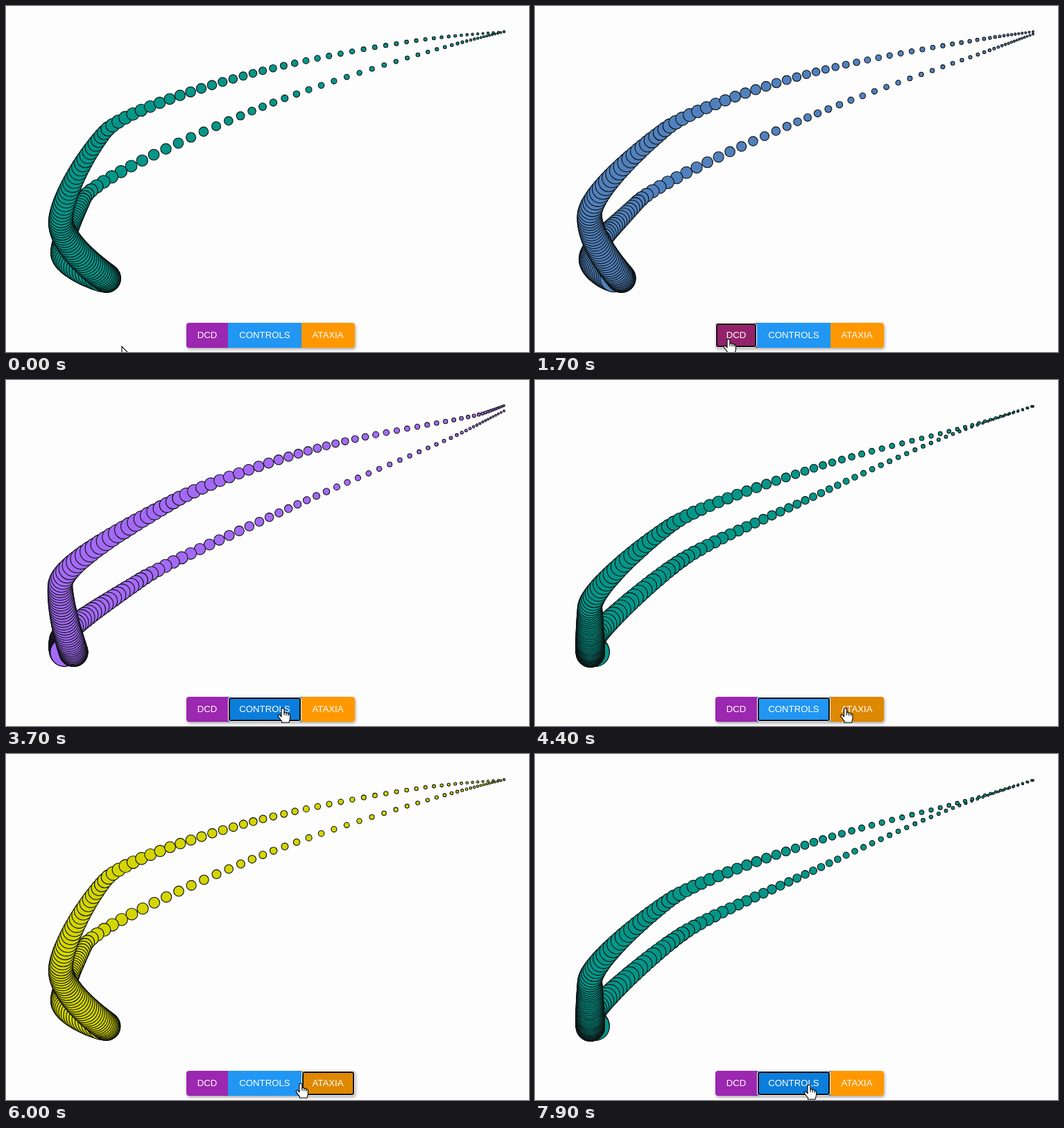
An HTML page with a canvas for the animation above (8000 ms loop, 754 by 498 pixels).

```html
<!DOCTYPE html>
<html lang="en">
<head>
<meta charset="utf-8">
<title>Gait cycle comparison</title>
<style>
  html, body { margin: 0; width: 754px; height: 498px; overflow: hidden; background: #fdfdfd; }
  canvas { position: absolute; left: 0; top: 0; }
  #pointer { z-index: 2; pointer-events: none; }
  .group {
    position: absolute; left: 259.7px; top: 456px; z-index: 1; display: flex;
    border-radius: 4px; box-shadow: 1px 2px 4px rgba(0, 0, 0, .35);
  }
  .group div {
    position: relative; height: 36px; padding: 0 16px; color: #fff; background: var(--base);
    font: 13.2px/36px "Liberation Sans", Arial, sans-serif;
  }
  .group div:first-child { border-radius: 4px 0 0 4px; }
  .group div:last-child { border-radius: 0 4px 4px 0; }
  .group .hover { background: var(--dark); }
  .group .focus::after {
    content: ""; position: absolute; inset: 0; border: 1px solid #fff;
    border-radius: 4px; box-shadow: inset 0 0 0 2px #101010;
  }
</style>
</head>
<body>
<canvas id="trail" width="754" height="498"></canvas>
<div class="group">
  <div style="--base:#9c27b0;--dark:#93226a">DCD</div>
  <div style="--base:#2196f3;--dark:#0b7dda">CONTROLS</div>
  <div style="--base:#ff9800;--dark:#dd8800">ATAXIA</div>
</div>
<canvas id="pointer" width="754" height="498"></canvas>
<script>
const LOOP = 8000, STEP = 100, MORPH = 1000, DOTS = 200;
const LEAD = 1190, TRAVEL = 550; // the pointer sets off this long before a click
const trail = document.getElementById('trail').getContext('2d');
const pointer = document.getElementById('pointer').getContext('2d');
const buttons = [...document.querySelectorAll('.group div')];

// Each shape runs from the tip along the lower strand, round the heel and back along the upper one.
const knots = [0, 14, 32, 50, 75, 92, 93, 128, 153, 170, 188, 199];
const ataxia = curve([
  [718, 37], [651, 54], [370, 145], [113, 276], [82, 354], [138, 391],
  [145, 392], [79, 309], [142, 182], [356, 97], [628, 45], [718, 37]]);
const dcd = curve([
  [718, 45], [661, 76], [422, 180], [193, 290], [80, 374], [84, 392],
  [99, 392], [78, 293], [245, 172], [467, 92], [691, 47], [718, 37]]);
const controls = curve([
  [718, 38], [612, 74], [401, 168], [205, 264], [80, 380], [87, 392],
  [80, 393], [79, 328], [193, 211], [402, 127], [640, 62], [716, 38]]);

const teal = [4, 150, 136], purple = [178, 102, 255], yellow = [214, 214, 0];
const moves = [
  { at: 1220, button: 0, spot: [279, 479], shapes: [ataxia, dcd], colors: [teal, purple] },
  { at: 3430, button: 1, spot: [399, 472], shapes: [dcd, controls], colors: [purple, teal] },
  { at: 5130, button: 2, spot: [457, 472], shapes: [controls, ataxia], colors: [teal, yellow] },
  { at: 6905, button: 1, spot: [395, 476], shapes: [ataxia, controls], colors: [yellow, teal] }
];

const arrow = new Path2D('M0 0V17L4 13.3L6.6 19.4L9.4 18.2L6.8 12.2H12Z');
const hand = new Path2D('M-2 1.5Q0-1 2 1.5V6.6Q4 5.4 5 7.3Q7 6.4 8 8.3Q10.5 8 10.5 11V15Q10 18 9 21H-1.5V19Q-4 16 -6.5 12.3Q-7.5 9.3 -4.5 10L-2 12.4Z');
const fingers = new Path2D('M2 6.6V10.5M5 7.3V11M8 8.3V11.5');

const clamp = v => Math.min(1, Math.max(0, v));
const mix = (a, b, p) => a.map((v, i) => v + (b[i] - v) * p);
const cubicInOut = t => t < .5 ? 4 * t ** 3 : 1 - 4 * (1 - t) ** 3;

// Dots swell smoothly from the tip to the heel.
const radius = i => 1.4 + 19.4 * Math.sin(Math.PI * (i - 2) / (DOTS - 1)) ** 2;

// Monotone cubic interpolation: smooth bends without overshoot.
function curve(points) {
  const last = knots.length - 1;
  const slope = (i, c) => (points[i + 1][c] - points[i][c]) / (knots[i + 1] - knots[i]);
  const tangent = (i, c) => {
    if (i === 0) return slope(0, c);
    if (i === last) return slope(last - 1, c);
    const a = slope(i - 1, c), b = slope(i, c);
    return a * b > 0 ? 2 * a * b / (a + b) : 0;
  };
  return Array.from({ length: DOTS }, (_, n) => {
    const i = Math.max(0, knots.findIndex(k => k >= n) - 1);
    const w = knots[i + 1] - knots[i], u = (n - knots[i]) / w, v = 1 - u;
    return [0, 1].map(c =>
      points[i][c] * v * v * (1 + 2 * u) + points[i + 1][c] * u * u * (3 - 2 * u) +
      w * u * v * (tangent(i, c) * v - tangent(i + 1, c) * u));
  });
}

function pointerAt(time) {
  return moves.reduce(
    (pos, m) => mix(pos, m.spot, clamp((time - m.at + LEAD) / TRAVEL)), [167, 490]);
}

function drawTrail({ shapes: [from, to], colors }, p) {
  trail.clearRect(0, 0, 754, 498);
  trail.fillStyle = `rgb(${mix(...colors, p).map(Math.round)})`;
  trail.strokeStyle = '#0c1010';
  trail.lineWidth = 1.1;
  from.forEach((dot, i) => {
    trail.beginPath();
    trail.arc(...mix(dot, to[i], p), radius(i), 0, 2 * Math.PI);
    trail.fill();
    trail.stroke();
  });
}

function drawPointer([x, y]) {
  const shape = x < 260 ? arrow : hand;
  pointer.clearRect(0, 0, 754, 498);
  pointer.save();
  pointer.translate(x, y);
  pointer.fillStyle = '#fff';
  pointer.strokeStyle = '#000';
  pointer.lineWidth = 1.1;
  pointer.fill(shape);
  pointer.stroke(shape);
  if (shape === hand) pointer.stroke(fingers);
  pointer.restore();
}

function render(time) {
  const active = moves.filter(m => m.at <= time).pop();
  const move = active || moves[0];
  drawTrail(move, cubicInOut(clamp((time - move.at) / MORPH)));
  drawPointer(pointerAt(time));

  // The hover colour trails the pointer by one step.
  const x = pointerAt(time - STEP)[0];
  const hovered = x < 260 ? -1 : x < 321 ? 0 : x < 426 ? 1 : 2;
  buttons.forEach((b, i) => {
    b.classList.toggle('hover', i === hovered);
    b.classList.toggle('focus', !!active && i === active.button);
  });
}

const start = performance.now();
function tick() {
  const time = (performance.now() - start) % LOOP;
  render(Math.floor(time / STEP) * STEP);
  requestAnimationFrame(tick);
}
tick();
</script>
</body>
</html>
```
